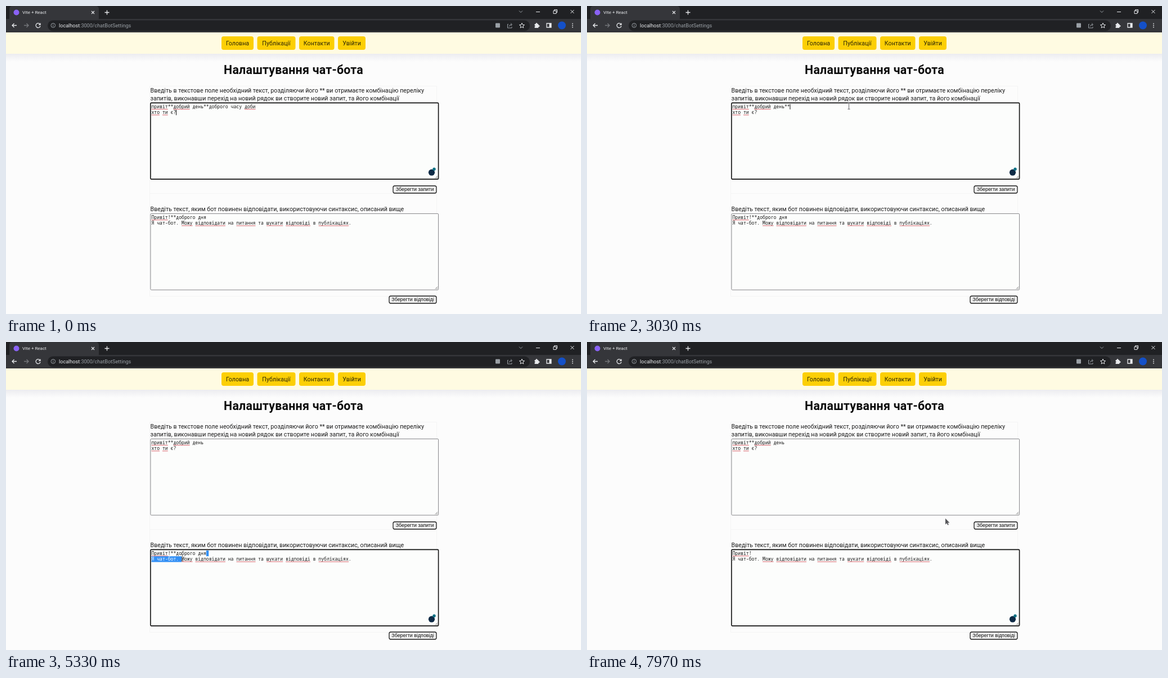
An HTML page with a canvas that plays this animation: 1022x548 px, repeating every 8000 ms.

```html
<!DOCTYPE html>
<html lang="uk">
<head>
<meta charset="utf-8">
<title>Налаштування чат-бота</title>
<style>
  html, body { margin: 0; width: 100%; height: 100%; overflow: hidden; background: #fcfcfc; }
  canvas { display: block; }
</style>
</head>
<body>
<canvas id="stage" width="1022" height="548"></canvas>
<script>
const ctx = document.getElementById('stage').getContext('2d');
const LOOP = 8000;
const SANS = 'Roboto, "Noto Sans", sans-serif';
const ARIAL = '"Liberation Sans", Arial, sans-serif';
const MONO = '8.12px "Noto Sans Mono", "DejaVu Sans Mono", monospace';

// Text grid of the two text areas
const LEFT = 258.5, PITCH = 4.87, ROW = 10.2;
const AREAS = [172, 369];
const MISSPELT = /привіт|добрий|доби|хто|ти(?= )|можу|відповідати|питання|шукати|відповіді|публікаціях/gi;

const REQUEST = 'привіт**добрий день**доброго часу доби';
const REPLY = 'Привіт!**доброго дня';
const REPLY_2 = 'Я чат-бот. Можу відповідати на питання та шукати відповіді в публікаціях.';

// Backspace presses: ten repeats, then single strokes
const erasures = [...Array.from({ length: 10 }, (_, i) => 2000 + i * 47.5),
  2600, 2670, 2730, 2730, 2870, 2930, 3000, 3070, 3130];

const CLICK = 1070, REFOCUS = 4830, DRAG = 4860, RELEASE = 6300, CUT = 7230;
const caretOn = [[0, 100], [630, 1570], [2070, 3700], [4230, 4760], [CUT, 7770]];

// Pointer path: time, x, y
const path = [
  [30, 620, 240], [350, 540, 205], [700, 456, 169], [870, 457, 170], [1070, 465.5, 178],
  [4000, 465.5, 178], [4170, 471, 289], [4450, 420, 350], [4800, 357, 376],
  [4860, 357, 376], [5000, 345, 384], [5330, 313.5, 384], [5640, 299, 385],
  [5680, 297, 377], [6240, 297, 377], [6270, 292, 377], [6430, 292, 377],
  [6570, 387, 335], [6830, 630, 316], [7070, 637, 314], [LOOP, 637, 314]
];

function pointerAt(t) {
  const next = path.findIndex(p => p[0] > t);
  if (next < 1) return null;
  const [t0, x0, y0] = path[next - 1], [t1, x1, y1] = path[next];
  const k = (t - t0) / (t1 - t0);
  return { x: x0 + (x1 - x0) * k, y: y0 + (y1 - y0) * k };
}

function rect(x, y, w, h, fill, radius = 0) {
  ctx.fillStyle = fill;
  ctx.beginPath();
  ctx.roundRect(x, y, w, h, radius);
  ctx.fill();
}

function frame(x, y, w, h, color, width = 1, radius = 0) {
  ctx.strokeStyle = color;
  ctx.lineWidth = width;
  ctx.beginPath();
  ctx.roundRect(x, y, w, h, radius);
  ctx.stroke();
}

function disc(x, y, r, fill) {
  ctx.fillStyle = fill;
  ctx.beginPath();
  ctx.arc(x, y, r, 0, 7);
  ctx.fill();
}

function stroke(d, color, width = 1) {
  ctx.strokeStyle = color;
  ctx.lineWidth = width;
  ctx.stroke(new Path2D(d));
}

function text(s, x, y, font, fill, align = 'left') {
  ctx.font = font;
  ctx.fillStyle = fill;
  ctx.textAlign = align;
  ctx.fillText(s, x, y);
}

function drawBrowser() {
  const light = '#e8eaed', grey = '#9aa0a6';
  rect(0, 0, 1022, 47, '#35363a');
  rect(0, 0, 1022, 23, '#202124');
  rect(6, 0, 159, 24, '#35363a', [5, 5, 0, 0]);
  disc(18.5, 11.5, 5, '#8a62f5');
  text('Vite + React', 29, 14.2, '8px ' + SANS, light);
  stroke('M152 9l5 5m0-5l-5 5', light, 1.1);
  stroke('M175.5 11.5h8m-4-4v8', light, 1.3);

  stroke('M912 8.5l3 3 3-3', grey);
  stroke('M942 10.5h7', light);
  stroke('M973 8.5h5v5h-5zM974.500 8v-1.500h5v5h-1.500', light);
  stroke('M1003.500 7l6 6m0-6l-6 6', light);

  stroke('M19 34.500h-8m3.500-3.500l-3.500 3.500 3.500 3.500', light, 1.3);
  stroke('M32 34.500h8m-3.500-3.500l3.500 3.500-3.500 3.500', '#75777b', 1.3);
  stroke('M60.500 32.500a4 4 0 1 0 .5 3M61 30.500v2.800h-3', light, 1.3);

  rect(74, 25.5, 857, 19, '#202124', 9.5);
  stroke('M80 34.500a3.800 3.800 0 1 0 7.600 0a3.800 3.800 0 1 0-7.600 0M83.800 34v2.500M83.800 32v1', grey);
  const font = '9.1px ' + SANS;
  text('localhost', 94, 38, font, light);
  text(':3000/chatBotSettings', 94 + ctx.measureText('localhost').width, 38, font, grey);

  rect(870, 30.5, 8, 8, grey, 1);
  stroke('M893 32.500h-1.500v6.500h7.500v-2M894 36.500q.5-3.500 5-3.500m-2-2.300l2.500 2.300-2.500 2.300', grey);
  stroke('M917 30.300l1.300 3 3.200.3-2.400 2.100.7 3.200-2.800-1.700-2.800 1.700.7-3.200-2.400-2.100 3.200-.3z', light);
  rect(939.5, 32, 7, 7, light, 1);
  disc(943, 31.5, 1.5, light);
  disc(947, 35.5, 1.5, light);
  disc(939.5, 35.5, 1.1, '#35363a');
  frame(961, 31, 8, 7, light, 1.3);
  rect(965.5, 31, 3.5, 7, light);
  disc(988, 34.5, 7, '#1450c8');
  for (const y of [31.3, 34.5, 37.7]) disc(1007, y, 0.9, light);
}

function drawPage() {
  rect(0, 47, 1022, 501, '#fcfcfc');
  const shade = ctx.createLinearGradient(0, 85, 0, 99);
  shade.addColorStop(0, '#ececf0');
  shade.addColorStop(1, '#fcfcfc');
  rect(0, 85, 1022, 14, shade);
  rect(0, 47, 1022, 38, '#fffbe2');

  const body = '10.67px ' + SANS, ink = '#1c1c1c';
  const menu = [['Головна', 383, 57], ['Публікації', 446.5, 68], ['Контакти', 521, 62.5], ['Увійти', 590, 49]];
  for (const [label, x, w] of menu) {
    rect(x, 54, w, 24, '#fccf05', 4);
    text(label, x + w / 2, 70, body, '#2b2606', 'center');
  }

  ctx.letterSpacing = '0.25px';
  text('Налаштування чат-бота', 511, 120.5, 'bold 21.33px ' + SANS, '#0b0b0b', 'center');
  ctx.letterSpacing = '0px';

  frame(255.5, 142.5, 510, 191, '#f4f4f5');
  frame(255.5, 333.5, 510, 183, '#f4f4f5');
  text('Введіть в текстове поле необхідний текст, розділяючи його ** ви отримаєте комбінацію переліку', 256.5, 154, body, ink);
  text('запитів, виконавши перехід на новий рядок ви створите новий запит, та його комбінації', 256.5, 168.3, body, ink);
  text('Введіть текст, яким бот повинен відповідати, використовуючи синтаксис, описаний вище', 256.5, 365.3, body, ink);

  for (const [label, x, y] of [['Зберегти запити', 688, 320], ['Зберегти відповіді', 681, 516]]) {
    rect(x, y, 765 - x, 13, '#efefef', 3);
    frame(x, y, 765 - x, 13, '#1d1d1d', 1.3, 3);
    text(label, (x + 765) / 2, y + 9, '8.89px ' + ARIAL, '#111', 'center');
  }
}

function drawArea(top, lines, focused, selection, caret) {
  rect(256.5, top, 512, 136, '#fcfdfc', 2);
  frame(256.9, top + 0.4, 511.7, 135.7, focused ? '#101010' : '#858588', focused ? 1.6 : 1, 1.5);
  stroke(`M763 ${top + 134.5}l4-4m-1.500 4l1.500-1.500`, '#555', 0.8);

  const baseline = row => top + 10 + row * ROW;
  lines.forEach((line, row) => {
    text(line, LEFT, baseline(row), MONO, '#151515');
    for (const word of line.matchAll(MISSPELT)) {
      rect(LEFT + word.index * PITCH, baseline(row) + 1.2, word[0].length * PITCH, 1, '#d9626a');
    }
  });

  for (const [row, from, to] of selection) {
    ctx.save();
    rect(LEFT + from * PITCH, baseline(row) - 8, (to - from) * PITCH, ROW, '#3390f5');
    ctx.clip();
    text(lines[row], LEFT, baseline(row), MONO, '#fff');
    ctx.restore();
  }

  if (caret) rect(LEFT + caret[1] * PITCH - 0.3, baseline(caret[0]) - 7.5, 1, 9.5, '#111');
  if (focused) {
    disc(756.5, top + 124.2, 5.6, '#0f2b46');
    disc(761, top + 118.3, 2.7, '#0b7285');
  }
}

function selectionAt(t, pointer) {
  if (t < DRAG || t >= CUT) return [];
  const end = REPLY.length;
  const { x, y } = t < RELEASE ? pointer : { x: 292, y: 377 };
  const col = Math.round((x - LEFT) / PITCH);
  if (y < 381) return [[0, Math.min(col, end), end]];
  return [[0, end, end + 0.9], [1, 0, col]];
}

function drawPointer({ x, y }) {
  const overText = x > 256 && x < 769 && AREAS.some(top => y > top && y < top + 136);
  if (overText) {
    stroke(`M${x - 2} ${y - 5.5}h4m-2 0v11m-2 0h4`, '#66666a', 1);
    return;
  }
  const arrow = new Path2D(`M${x} ${y}v10.500l2.500-2.300 1.700 3.600 1.600-.8-1.700-3.400h3.200z`);
  ctx.lineWidth = 1;
  ctx.strokeStyle = '#e4e4e4';
  ctx.stroke(arrow);
  ctx.fillStyle = '#56565a';
  ctx.fill(arrow);
}

function draw(t) {
  const pointer = pointerAt(t);
  const length = REQUEST.length - erasures.filter(time => time <= t).length;
  const second = t >= REFOCUS;
  const blink = caretOn.some(([from, to]) => t >= from && t < to);
  const firstCaret = t < CLICK ? [1, 9] : [0, length];
  const reply = t < CUT ? REPLY : REPLY.slice(0, 7);

  drawBrowser();
  drawPage();
  drawArea(AREAS[0], [REQUEST.slice(0, length), 'хто ти є?'], !second, [], !second && blink && firstCaret);
  drawArea(AREAS[1], [reply, REPLY_2], second, selectionAt(t, pointer), second && blink && [0, 7]);
  if (pointer) drawPointer(pointer);
}

const start = performance.now();
function tick(now) {
  draw(Math.max(0, now - start) % LOOP);
  requestAnimationFrame(tick);
}
tick(start);
</script>
</body>
</html>
```
